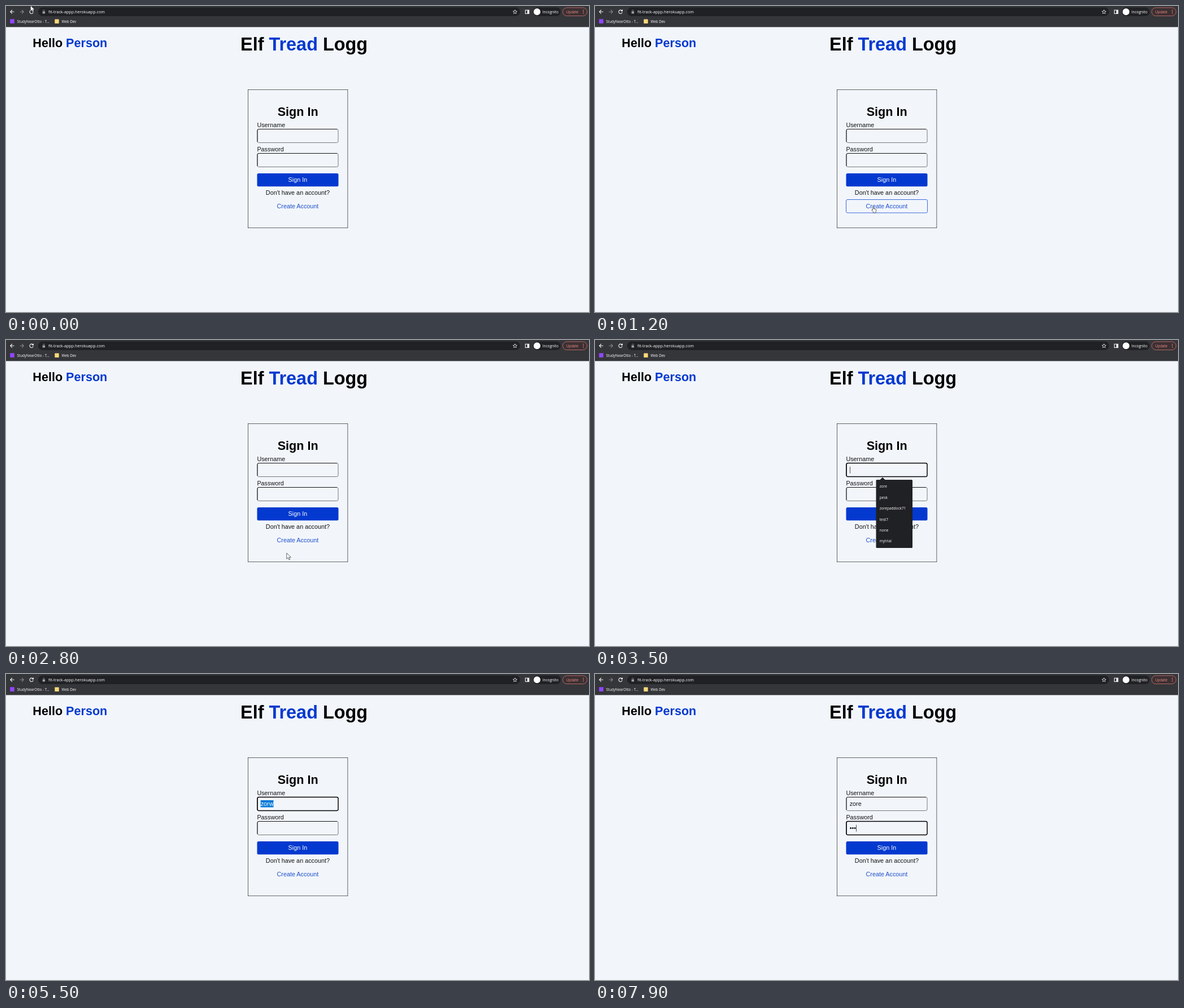
An HTML page that plays this animation: 1032x543 px, repeating every 8000 ms.

```html
<!DOCTYPE html>
<html lang="en">
<head>
<meta charset="utf-8">
<title>Sign in demo</title>
<style>
  html, body { margin: 0; width: 100%; height: 100%; overflow: hidden; background: #f2f6fb; }
  svg { display: block; width: 100vw; height: 100vh; }
  text { white-space: pre; }
  .page { font: 10.8px "Liberation Sans", Arial, sans-serif; fill: #111; }
  .bold { font-weight: 700; fill: #000; }
  .h1 { font-size: 32.4px; }
  .h2 { font-size: 21.6px; }
  .blue { fill: #0339cf; }
  .link { fill: #1f4fcb; }
  .light { fill: #fff; }
  .mid { text-anchor: middle; }
  .ui { font: 500 6.27px "Open Sans", "Noto Sans", sans-serif; fill: #fff; }
  .line { fill: none; stroke: #f1f3f4; stroke-width: 1.1; }
  .frame { fill: #f2f6fb; stroke: #000; stroke-width: .6; }
  .hover { fill: none; stroke: #3c68dc; }
  .pointer { fill: #fff; stroke: #222; stroke-width: .7; stroke-linejoin: round; }
</style>
</head>
<body>
<svg viewBox="0 0 1032 543" preserveAspectRatio="none">
  <rect width="1032" height="543" fill="#f2f6fb"/>

  <!-- Browser bar -->
  <g class="ui">
    <rect width="1032" height="37.4" fill="#35363a"/>
    <rect x="57" y="2.5" width="853" height="15.5" rx="7.75" fill="#202124"/>
    <path class="line" d="M14.5 10.3H7.8M11 7L7.7 10.3L11 13.6"/>
    <path class="line" d="M24.5 10.3H31.2M28 7L31.3 10.3L28 13.6" style="stroke:#85878b"/>
    <path class="line" d="M47.6 8.3A3.2 3.2 0 1 0 48.2 11.2"/>
    <path d="M49 6V9.6H45.4Z"/>
    <rect x="64.7" y="9.4" width="4.4" height="4" rx=".5" fill="#9aa0a6"/>
    <path class="line" d="M65.6 9.5V8.4A1.3 1.3 0 0 1 68.2 8.4V9.5" style="stroke:#9aa0a6;stroke-width:.7"/>
    <text x="75" y="12.8" style="font-size:7.2px">fit-track-appp.herokuapp.com</text>
    <path class="line" style="stroke-width:.8" d="M901 6.8L902 9.2L904.6 9.4L902.6 11.1L903.2 13.6L901 12.2L898.8 13.6L899.4 11.1L897.4 9.4L900 9.2Z"/>
    <rect class="line" x="919.4" y="7.3" width="6.4" height="6.2"/>
    <rect x="922.8" y="7.3" width="3" height="6.2"/>
    <rect x="933" y="2.5" width="49" height="15.5" rx="7.75" fill="#202124"/>
    <circle cx="940" cy="10.3" r="6"/>
    <text x="949.7" y="12.6" style="font-size:6.5px">Incognito</text>
    <rect x="985.5" y="3" width="43" height="14.5" rx="7.25" fill="#3b3033" stroke="#d9736c" stroke-width=".8"/>
    <g fill="#f28b82">
      <text x="991.8" y="12.5">Update</text>
      <circle cx="1022" cy="7.6" r=".8"/><circle cx="1022" cy="10.3" r=".8"/><circle cx="1022" cy="13" r=".8"/>
    </g>
    <rect x="7.2" y="23.3" width="7.6" height="7.6" fill="#9146ff"/>
    <text x="19.5" y="29.7">StudyNearOtto - T...</text>
    <rect x="86.3" y="23.5" width="7.4" height="7.6" rx=".6" fill="#fbd978"/>
    <text x="98.5" y="29.7">Web Dev</text>
  </g>

  <g class="page">
    <text class="bold h2" x="47.3" y="73.4">Hello <tspan class="blue">Person</tspan></text>
    <text class="bold h1 mid" x="527.6" y="78.6">Elf <tspan class="blue">Tread</tspan> Logg</text>
    <g id="signIn"></g>
    <rect id="ring" x="445" width="143" height="24" rx="2.5" fill="none" stroke="#000" stroke-width="1.3"/>
    <rect id="mark" x="450.7" y="224" height="12.5" fill="#0078d7"/>
    <text id="user" x="450.7" y="234"></text>
    <text id="pass" x="450.7" y="277"></text>
    <rect id="caret" width=".7" height="12" fill="#000"/>
    <g id="signUp"></g>
  </g>

  <g id="list" class="ui" style="font-size:6.5px"></g>
  <path id="arrow" class="pointer" d="M0 0V10.4L2.5 8.2L4.2 12L5.9 11.2L4.3 7.6H7.5Z"/>
  <path id="hand" class="pointer" d="M1.7 6.8V1Q2.5 -.4 3.3 1V4.6L7 5.5Q8 5.9 7.8 7L7 10.2V12H2.8V10.6L.1 7.6Q-.3 6.3 .8 6.4Z"/>
</svg>

<script>
const LOOP = 8000;
const el = id => document.getElementById(id);
const set = (id, attrs) => {
  for (const key in attrs) el(id).setAttribute(key, attrs[key]);
};

const field = (label, y) => `
  <text x="444.4" y="${y - 3}">${label}</text>
  <rect x="445" y="${y + .5}" width="143" height="24" rx="2.5" fill="none" stroke="#777"/>
  <path d="M445 ${y + 23}V${y + 3}Q445 ${y + .5} 447.5 ${y + .5}H586" fill="none" stroke="#111"/>`;

function buildCard(id, title, labels, note, link) {
  const y = 210.6 + labels.length * 43.2;
  const line = (text, dy, style = "") =>
    `<text class="mid ${style}" x="516.4" y="${y + dy}">${text}</text>`;
  el(id).innerHTML = `
    <rect class="frame" x="428.4" y="148.6" width="176.5" height="${y - 51.8}"/>
    <text class="bold h2 mid" x="516.7" y="195.2">${title}</text>
    ${labels.map((label, i) => field(label, 218 + Math.round(i * 43.2))).join("")}
    <rect x="444.5" y="${y}" width="144" height="23.3" rx="2.5" fill="#0339cf"/>
    ${line(title, 15.4, "light")}
    ${line(note, 38.4)}
    ${line(link, 61.7, "link")}
    <rect id="${id}Hover" class="hover" x="444.5" y="${Math.round(y + 46) + .5}" width="144" height="23.5" rx="2.5"/>`;
}

buildCard("signIn", "Sign In", ["Username", "Password"], "Don't have an account?", "Create Account");
buildCard("signUp", "Sign Up", ["Name", "Username", "Password"], "Already have an account?", "Sign In");

const NAMES = ["zore", "pesk", "zorepaddock71", "test7", "none", "mytrial"];

function drawList(prefix) {
  const names = NAMES.filter(name => name.startsWith(prefix));
  el("list").innerHTML = `
    <path d="M504 248.5L509 243.7L514 248.5Z" fill="#202124"/>
    <rect x="497.5" y="248" width="64.5" height="${4.5 + names.length * 19.42}" rx="1.5" fill="#202124"/>
    ${names.map((name, i) => `<text x="503.8" y="${262.3 + i * 19.42}">${name}</text>`).join("")}`;
}

const START = {
  x: 43.3, y: -1, pointer: "arrow", signUp: 0, inHover: 0, upHover: 0,
  user: "", pass: "", focus: "", caret: 0, marked: 0, list: 0, prefix: ""
};

// Each step holds until the next and changes only what it names.
const STEPS = [
  [100, { x: 257, y: 84 }],
  [300, { x: 300, y: 126 }],
  [400, { x: 398, y: 213 }],
  [500, { x: 443, y: 255.5 }],
  [700, { x: 450, y: 278 }],
  [800, { x: 468, y: 318 }],
  [900, { x: 482, y: 341 }],
  [1000, { x: 490, y: 355, pointer: "hand", inHover: .4 }],
  [1100, { inHover: .8 }],
  [1200, { inHover: 1 }],
  [1600, { signUp: 1, inHover: 0, pointer: "arrow" }],
  [1900, { pointer: "" }],
  [2100, { x: 496.8, y: 393, pointer: "hand", upHover: .4 }],
  [2200, { upHover: .8 }],
  [2300, { upHover: 1 }],
  [2500, { signUp: .5, pointer: "arrow" }],
  [2600, { signUp: 0, upHover: 0 }],
  [2800, { y: 378 }],
  [2900, { y: 328 }],
  [3000, { y: 270 }],
  [3100, { y: 242.5 }],
  [3300, { pointer: "", focus: "user", caret: 1 }],
  [3500, { list: 1 }],
  [3800, { caret: 0 }],
  [4100, { user: "z", prefix: "z", caret: 1 }],
  [4200, { user: "zo" }],
  [4300, { user: "zor" }],
  [4600, { user: "zorw", list: .5 }],
  [4700, { list: 0, focus: "pass" }],
  [5200, { caret: 0 }],
  [5500, { focus: "user", marked: 1 }],
  [5900, { marked: 0, caret: 1 }],
  [6400, { user: "zor", list: .5 }],
  [6500, { list: 1 }],
  [6900, { user: "zore" }],
  [7100, { list: .5, focus: "pass" }],
  [7200, { list: 0 }],
  [7600, { caret: 0 }],
  [7700, { pass: "•", caret: 1 }],
  [7800, { pass: "••" }],
  [7900, { pass: "•••" }]
];

let shownPrefix = null;

function draw(time) {
  const s = { ...START };
  for (const [at, change] of STEPS) if (at <= time) Object.assign(s, change);

  for (const kind of ["arrow", "hand"])
    set(kind, { transform: `translate(${s.x} ${s.y})`, opacity: +(s.pointer === kind) });
  set("signUp", { opacity: s.signUp });
  set("signInHover", { opacity: s.inHover });
  set("signUpHover", { opacity: s.upHover });

  el("user").textContent = s.user;
  el("pass").textContent = s.pass;
  const width = id => s[id] ? el(id).getComputedTextLength() : 0;
  const drop = s.focus === "pass" ? 43 : 0;
  set("ring", { y: 218.5 + drop, opacity: +!!s.focus });
  set("caret", {
    x: 451 + (s.focus ? width(s.focus) : 0), y: 224.7 + drop, opacity: s.caret
  });
  set("mark", { width: width("user"), opacity: s.marked });
  set("user", { fill: s.marked ? "#fff" : "#111" });

  if (s.prefix !== shownPrefix) drawList(shownPrefix = s.prefix);
  set("list", { opacity: s.list });
}

const begin = performance.now();
function tick() {
  draw((performance.now() - begin) % LOOP);
  requestAnimationFrame(tick);
}
tick();
</script>
</body>
</html>
```
